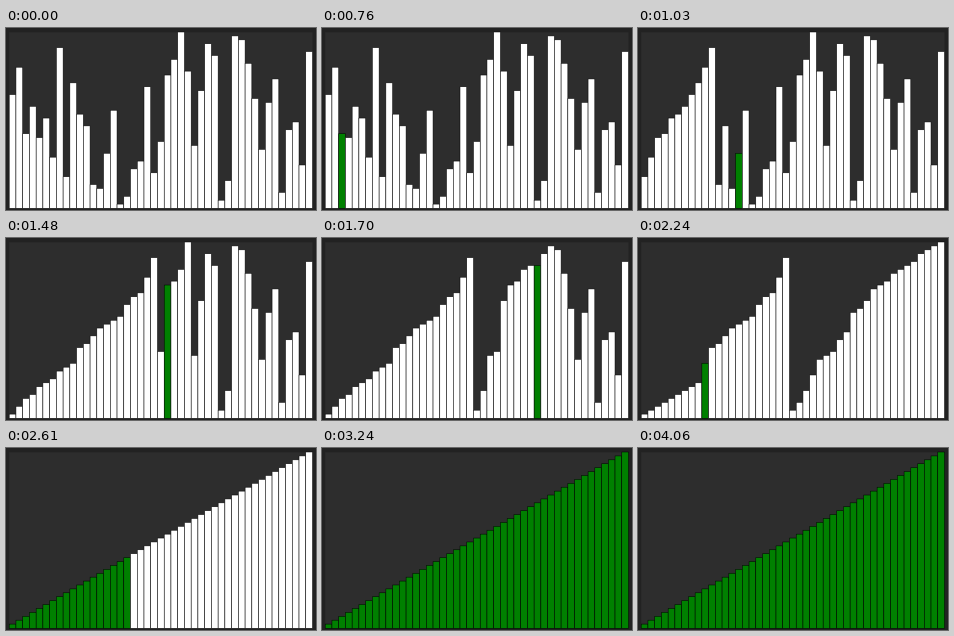
A matplotlib script that plays this animation: 310 by 182 pixels, repeating every 4120 ms.

```python
import matplotlib.pyplot as plt
import numpy as np
from matplotlib.animation import FuncAnimation

W, H, DPI = 310, 182, 100
LOOP, TICK, FPS = 4120, 10, 33
LEFT, PITCH, FLOOR, UNIT = 3.2, 6.74, 180.3, 3.911
LIFT, EDGE = 0.3, 0.5
BODY, PANEL = "#222222", "#2d2d2d"

# the shuffled order to be sorted
ORDER = [29, 36, 19, 26, 18, 23, 13, 41, 8, 32, 24, 21, 6, 5, 14,
         25, 1, 3, 10, 12, 31, 9, 17, 34, 38, 45, 35, 16, 30, 42,
         39, 2, 7, 44, 43, 37, 28, 15, 27, 33, 4, 20, 22, 11, 40]
N = len(ORDER)


def merge_writes(a, lo, hi):
    """Yield (position, value) for every write of a top-down merge sort."""
    if hi - lo < 2:
        return
    mid = (lo + hi) // 2
    yield from merge_writes(a, lo, mid)
    yield from merge_writes(a, mid, hi)
    a[lo:hi] = sorted(a[lo:hi])
    yield from zip(range(lo, hi), a[lo:hi])


def build_states():
    """List (bars, marked positions); a bar is marked just before its write."""
    bars = list(ORDER)
    states = [(tuple(bars), ())]
    for pos, value in merge_writes(list(ORDER), 0, N):
        states.append((tuple(bars), (pos,)))
        bars[pos] = value
    for done in range(1, N + 1):
        states.append((tuple(bars), range(done)))
    return states


STATES = build_states()

# (refresh, step) key points; the sort runs at about 4.4 steps per refresh
PACE = [(25, 5), (42, 81), (49, 109), (63, 168), (92.1, len(STATES) - 1)]


def step_at(ms):
    refresh = int((ms + 5) * FPS / 1000)
    return round(float(np.interp(refresh, *zip(*PACE), left=0)))


def add_box(x, width, height, **style):
    return ax.add_patch(plt.Rectangle((x, FLOOR - height), width, height,
                                      snap=False, **style))


fig = plt.figure(figsize=(W / DPI, H / DPI), dpi=DPI, facecolor=BODY)
ax = fig.add_axes([0, 0, 1, 1])
ax.set_xlim(0, W)
ax.set_ylim(H, 0)
ax.axis("off")
add_box(LEFT, N * PITCH, N * UNIT, facecolor=PANEL, edgecolor="none")
rects = [add_box(LEFT + i * PITCH, PITCH, 0, edgecolor="black",
                 linewidth=EDGE * 72 / DPI) for i in range(N)]


def draw(tick):
    bars, marked = STATES[step_at(tick * TICK)]
    for i, (rect, value) in enumerate(zip(rects, bars)):
        height = value * UNIT + LIFT
        rect.set_y(FLOOR - height)
        rect.set_height(height)
        rect.set_facecolor("green" if i in marked else "white")
    return rects


anim = FuncAnimation(fig, draw, frames=LOOP // TICK, interval=TICK,
                     init_func=lambda: draw(0), repeat=True, repeat_delay=0)
plt.show()
```
